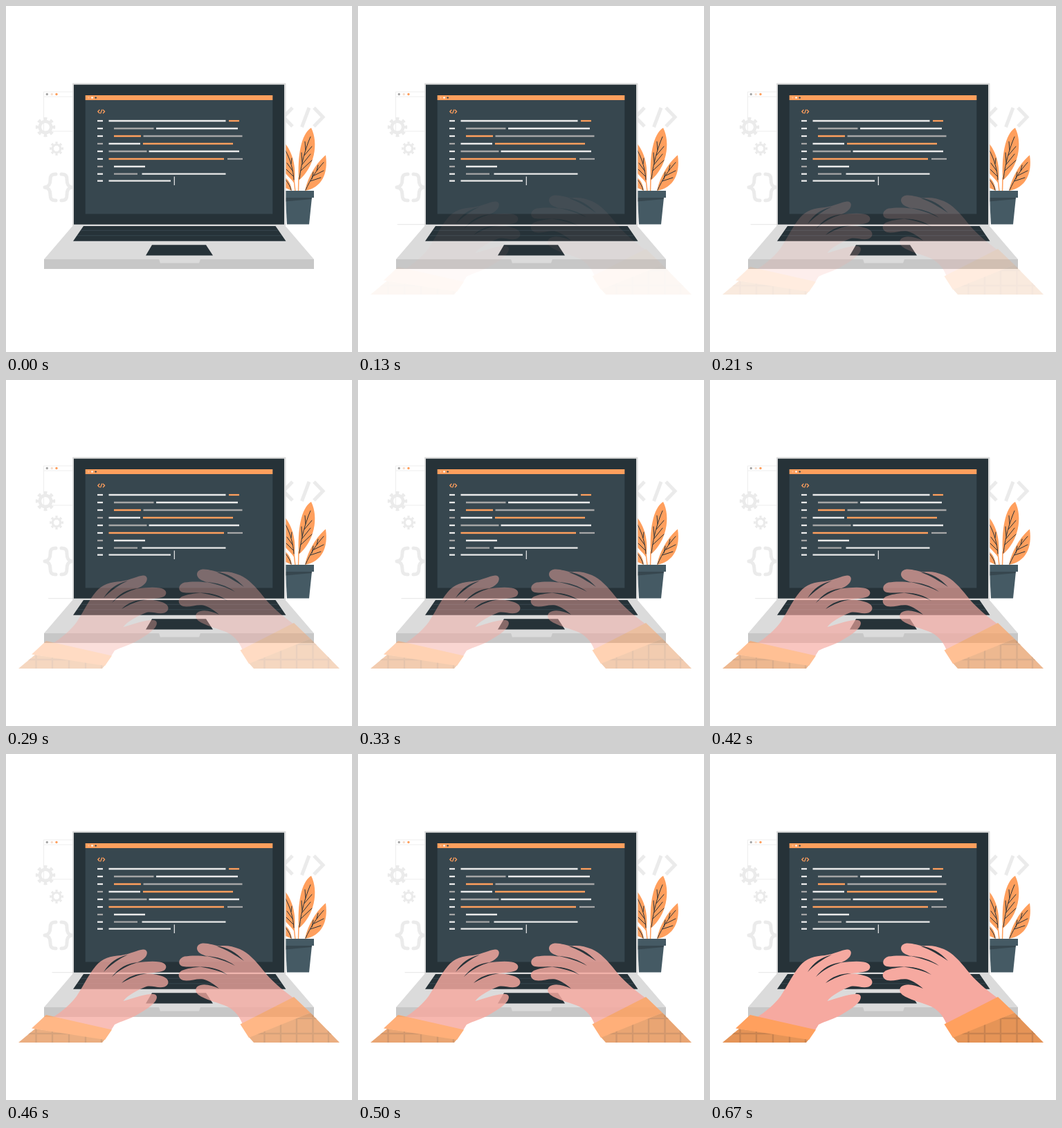
Animation of 500x500 px, one loop 1.04 s. Source, as an HTML page:

```html
<!DOCTYPE html>
<html lang="en">
<head>
<meta charset="utf-8">
<title>Typing hands</title>
<style>
  html, body { margin: 0; height: 100%; overflow: hidden; background: #fff; }
  svg { display: block; width: 100vw; height: 100vh; }
  .line { fill: none; stroke-linecap: round; stroke-linejoin: round; }
</style>
</head>
<body>
<svg viewBox="0 0 500 500">
  <defs>
    <g id="gear" fill="none" stroke="#ebebeb">
      <circle r="8.2" stroke-width="4.6"/>
      <circle r="12" stroke-width="4.4" pathLength="16" stroke-dasharray="1" stroke-dashoffset=".5"/>
    </g>
    <clipPath id="sleeves">
      <path d="M42 397L18 417H139L144 411ZM440 374L482 417H358L350 408Z"/>
    </clipPath>
  </defs>

  <!-- backdrop -->
  <path d="M100 124H54.5V181H100M54.5 131H100" fill="none" stroke="#ededed" stroke-width=".9"/>
  <circle cx="59.3" cy="127.5" r="1.7" fill="#a6a6a6"/>
  <circle cx="66.3" cy="127.5" r="1.7" fill="#f5ddcd"/>
  <circle cx="73" cy="127.5" r="1.7" fill="#ff9f5d"/>
  <use href="#gear" x="57" y="175"/>
  <use href="#gear" transform="translate(73 206) scale(.7)"/>
  <g class="line" stroke="#ebebeb" stroke-width="5">
    <path d="M72 243C65 243 64 246 64 251C64 258 62 261 56 262C62 263 64 266 64 273C64 278 65 281 72 281"/>
    <path d="M80 243C87 243 88 246 88 251C88 258 90 261 95 262C90 263 88 266 88 273C88 278 87 281 80 281"/>
    <path stroke-linecap="butt" stroke-linejoin="miter" d="M414 147L401 160.500L414 174M438 147L427.500 175M445 147L458 160.500L445 174"/>
  </g>

  <!-- plant -->
  <g fill="#ff9f5d">
    <path d="M423 252C421 218 426 185 441 176C452 198 446 233 423 252Z"/>
    <path d="M432 267C436 247 449 226 462 215.500C466 242 456 263 432 267Z"/>
    <path d="M402 197C414 211 420 232 416.500 256C411 249 406 244 402 240Z"/>
    <path d="M402 247C409 251 412 259 413 267L402 262Z"/>
  </g>
  <path class="line" stroke="#ff9f5d" stroke-width="1.500" d="M416 250L418 268M423 248L422.500 268"/>
  <g class="line" stroke="#263238" stroke-width="1">
    <path d="M424 250C427 226 433 205 440 189M428 229L440 214M426 238L442 223M431 216L442 203M428 226L427 212M433 208L432 196"/>
    <path d="M433 266C440 250 449 237 459 226M440 253L455 248M445 245L459 238M442 250L444 240M449 238L451 230"/>
    <path d="M404 209C411 222 415 237 416 251M414 238L406 227M415 246L405 236M412 228L413 220M404 251C408 256 411 261 412 266"/>
  </g>
  <path fill="#455a64" d="M404 277H442L438 315.500H406Z"/>
  <path fill="#37474f" d="M404 276H442L441.500 279L404 282.500Z"/>
  <path fill="#455a64" d="M404 267H445V277H404Z"/>

  <path id="desk" stroke="#dedede" stroke-width=".8"/>

  <!-- laptop -->
  <rect x="96" y="111.500" width="308.500" height="206" rx="1" fill="#dbdbdb"/>
  <rect x="98" y="113.700" width="304" height="202" fill="#263238"/>
  <rect x="114.700" y="129" width="270.600" height="171.500" fill="#37474f"/>
  <rect x="114.700" y="129" width="270.600" height="7" fill="#ff9f5d"/>
  <circle cx="119.300" cy="132.500" r="1.300" fill="#ffb787"/>
  <circle cx="124.500" cy="132.500" r="1.300" fill="#fff"/>
  <circle cx="129.700" cy="132.500" r="1.300" fill="#37474f"/>
  <path class="line" stroke="#ff9f5d" stroke-width="1.300" d="M135 150.300L132.800 152.500L135 154.700M138.700 150L136.700 155M140.400 150.300L142.600 152.500L140.400 154.700"/>
  <g id="code" stroke-width="2.300"></g>
  <path stroke="#ebebeb" stroke-width="1.200" d="M243.300 246.500V259"/>

  <path fill="#dbdbdb" d="M97 317H403L445 366H55Z"/>
  <path fill="#c7c7c7" d="M55 366H445V380H55Z"/>
  <path fill="#dbdbdb" d="M221 366H281L279 371.500H223Z"/>
  <path fill="#263238" d="M112 318H389.500L404.500 339.800H97ZM211 345.300H289L299 360.500H202Z"/>
  <path stroke="#37474f" stroke-width="1" d="M108 324.300H393M103 331.800H398"/>

  <g id="hands">
    <path fill="#e59457" d="M42 397L18 417H139L144 411ZM440 374L482 417H358L350 408Z"/>
    <path clip-path="url(#sleeves)" fill="none" stroke="#c98350" stroke-width="2.400"
      d="M43.500 390V420M67 390V420M91 390V420M115 390V420M138 390V420M18 404H150M373.500 370V420M397 370V420M420 370V420M443.500 370V420M466 370V420M345 404H482M345 382H482"/>
    <g fill="#f6a9a0">
      <path d="M67 381C80 373 93 362 102 350C112 335 119 319 130 306C139 295 151 292 166 291C180 289 190 283 198 282.500C204 282 206 288 201 294C197 298 193 300 189 301.500C201 300 213 299 222 300.500C232 302 234 309 228 313C221 316 211 316 202 317.500C211 317 221 319 228 322C237 326 236 334 229 336.500C220 339 211 334 203 336C190 341 175 349 169.500 357C181 354 196 348 209 347C218 346 220 351 216 357C211 364 201 370 191 376C180 383 166 386 157 391L152 399Z"/>
      <path d="M416 353C397 339 383 327 372 313C361 299 350 287 338 282C328 278 318 276 309 277.500C302 277 293 273 284 273.500C275 275 274 282 279 287C283 290 287 291 291 292.500C280 291 267 291 258 292.500C249 295 248 304 254 306.500C262 309 273 306 282 308C272 308 261 310 254 313C247 317 249 325 256 327C265 329 275 324 285 325.500C294 328 301 333 308 339C299 335 289 332 281 334C273 336 272 343 278 348C288 355 302 358 315 363C327 367 337 377 342 391Z"/>
    </g>
    <path fill="#263238" d="M141 315C150 301 160 294 176 290C163 296 151 305 141 315ZM153 322C163 309 175 302 191 301C176 305 164 312 153 322ZM167 331C176 322 188 317 204 317C190 319 179 324 167 331ZM304 277.500C320 279 333 287 344 299C332 291 319 283 304 277.500ZM288 291.500C305 293 319 297 331 306C318 299 304 295 288 291.500ZM280 307.500C296 307 309 311 320 319C308 313 296 310 280 307.500Z"/>
    <path fill="#ffa05e" d="M58 377L153 398.500L143 413L37 396.500ZM338.500 390.500L416 351L440 374L351 410Z"/>
  </g>
</svg>
<script>
const byId = id => document.getElementById(id);
const W = '#ebebeb', G = '#a6a6a6', O = '#ff9f5d';

// Each row: y, then [start, end, colour] per dash
const rows = [
  [166, [132, 140, W], [148.5, 317.5, W], [322, 337, O]],
  [177, [132, 140, W], [156, 213.5, G], [217, 335, W]],
  [188, [132, 140, W], [156, 195, O], [198.5, 341.5, G]],
  [199, [132, 140, G], [148.5, 194, W], [198, 328, O]],
  [210, [132, 140, W], [148.5, 203.5, G], [206.5, 337, W]],
  [221, [132, 140, W], [148.5, 315, O], [320, 342, G]],
  [232, [132, 140, G], [156, 201, W]],
  [242.7, [132, 140, W], [156, 190, G], [196.5, 317.5, W]],
  [252.7, [132, 140, W], [148.5, 238, W]]
];
byId('code').innerHTML = rows.map(([y, ...dashes]) => dashes.map(([a, b, c]) =>
  `<path d="M${a} ${y}H${b}" stroke="${c}"/>`).join('')).join('');

const LOOP = 1040, START = 80, STEP = 41.6, STEPS = 15;

function draw(now) {
  const t = now % LOOP;
  const step = Math.min(STEPS, Math.floor((t - START) / STEP) + 1);
  const p = step > 0 ? (step + .3) / (STEPS + .3) : 0;
  const fade = p * p * (3 - 2 * p);
  byId('hands').setAttribute('opacity', fade);
  byId('desk').setAttribute('d', fade ? `M${56 + 14 * fade} 315.700H97` : '');
  requestAnimationFrame(draw);
}
draw(0);
</script>
</body>
</html>
```
